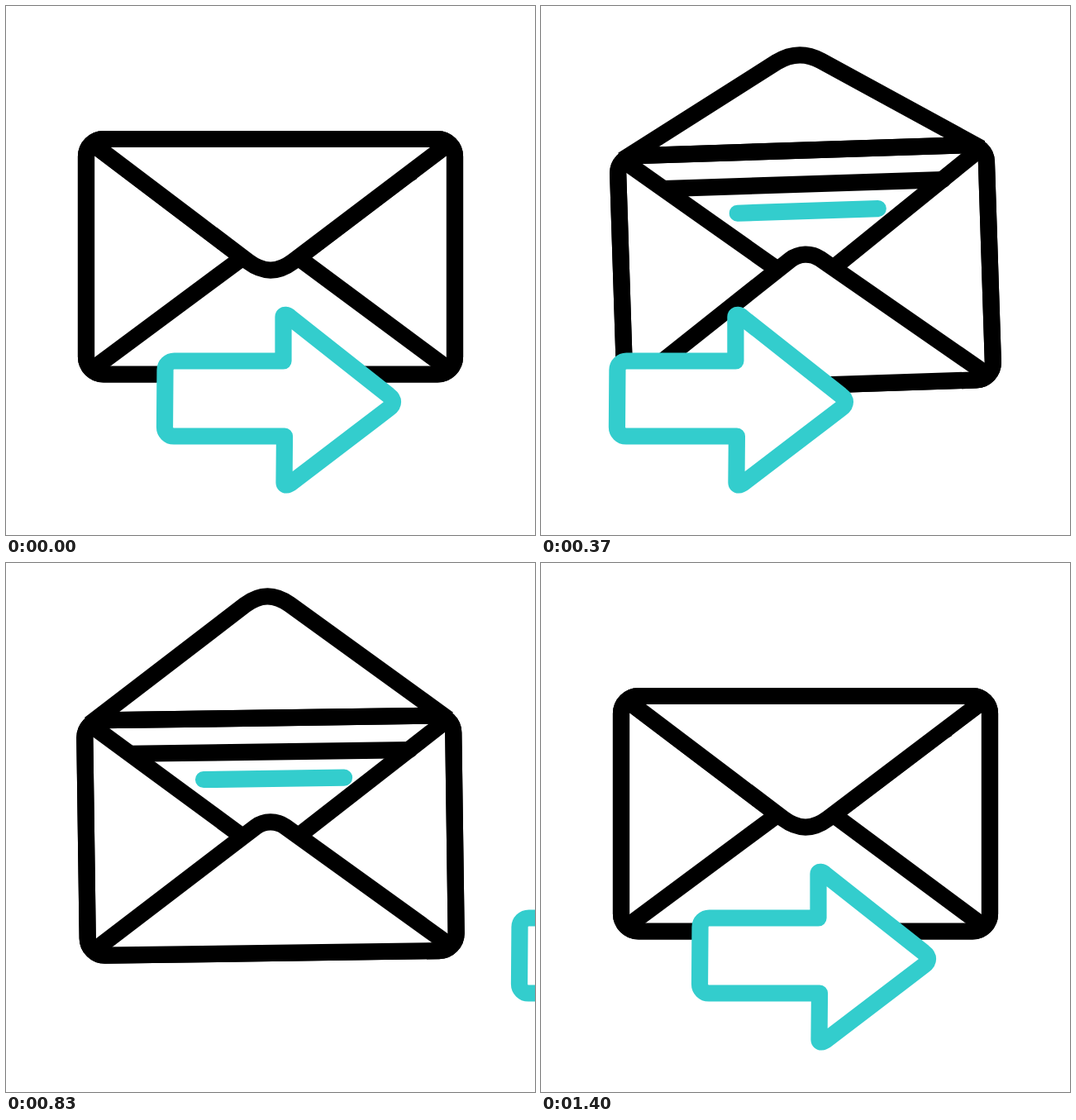
Write an HTML page that moves like this. It is 640 by 640 pixels and loops after 1670 ms.

```html
<!DOCTYPE html>
<html lang="en">
<head>
<meta charset="utf-8">
<title>Send mail</title>
<style>
  html, body { margin: 0; width: 100%; height: 100%; overflow: hidden; background: #fff; }
  svg { display: block; width: 100vw; height: 100vh; }
  path, rect { stroke: #000; stroke-width: 20.2; stroke-linejoin: round; fill: none; }
  .round { stroke-linecap: round; }
  .white { fill: #fff; }
  .teal { stroke: #33cdcd; }
</style>
</head>
<body>
<svg viewBox="0 0 640 640">
  <g id="mail">
    <path id="back" class="white"/>
    <rect class="white" x="97" y="161" width="446" height="284.5" rx="21"/>
    <path class="round" d="M152 202H489.5"/>
    <path class="round teal" d="M240 234.5H410"/>
    <path d="M103 165.5L300 314.6M537 165.5L340 314.6"/>
    <path class="white" d="M103 440.5L302 292.8C312.5 285 327.5 285 338 292.8L537 440.5"/>
    <path id="front" class="white"/>
    <rect x="97" y="161" width="446" height="284.5" rx="21"/>
  </g>
  <path id="arrow" class="white teal" d="M203.500 429.500H335.500V376C335.500 373 340 373 344 377
    L463 471C469.700 476 469.700 482 463 487L346 576.300C341 580.500 336.500 580.500 336.500 576.500
    L337 520.500H203A11 11 0 0 1 192 509.500L192.500 440.500A11 11 0 0 1 203.500 429.500Z"/>
</svg>
<script>
  const LOOP = 1670, STEP = 1000 / 30;
  const get = id => document.getElementById(id);
  const mail = get('mail'), back = get('back'), front = get('front'), arrow = get('arrow');

  // [step, value] pairs, linear in between
  const TILT = [[1, 0], [7, -13.7], [14, 7], [21, -2.4], [27, 0]];
  const DROP = [[1, 0], [5, 0.5], [8, 7], [14, 20.2], [18.5, 30.5], [23.4, 30.5], [35.3, 0]];
  const FLAP = [[1, 1], [12.15, -0.984], [25, -0.984], [32.4, 1]];

  function track(keys, k) {
    if (k <= keys[0][0]) return keys[0][1];
    for (let i = 1; i < keys.length; i++) {
      const [a, u] = keys[i - 1], [b, v] = keys[i];
      if (k < b) return u + (v - u) * (k - a) / (b - a);
    }
    return keys[keys.length - 1][1];
  }

  // Pull back, shoot off to the right, return from the left
  function arrowX(k) {
    if (k < 1 || k >= 42) return 0;
    if (k < 14) {
      const u = (k - 0.7) / 13.3;
      return -115 * u * u * (3 - 2 * u);
    }
    if (k < 28) return -115 + 544 * ((k - 14) / 11) ** 1.8;
    return -429 * ((42 - k) / 11) ** 1.8;
  }

  function flapPath(s) {
    const y = h => (165.5 + h * s).toFixed(2);
    return `M103 165.5L293 ${y(143.8)}C311.3 ${y(157.4)} 328.7 ${y(157.4)} 347 ${y(143.8)}L537 165.5`;
  }

  function draw(ms) {
    const k = Math.floor((ms % LOOP + 5) / STEP);
    const s = track(FLAP, k);
    mail.setAttribute('transform', `translate(0 ${track(DROP, k)}) rotate(${track(TILT, k)} 320 303)`);
    back.setAttribute('d', s < 0 ? flapPath(s) : '');
    front.setAttribute('d', s < 0 ? '' : flapPath(s));
    arrow.setAttribute('transform', `translate(${arrowX(k)} 0)`);
  }

  const start = performance.now();
  function tick() {
    draw(performance.now() - start);
    requestAnimationFrame(tick);
  }
  tick();
</script>
</body>
</html>
```
